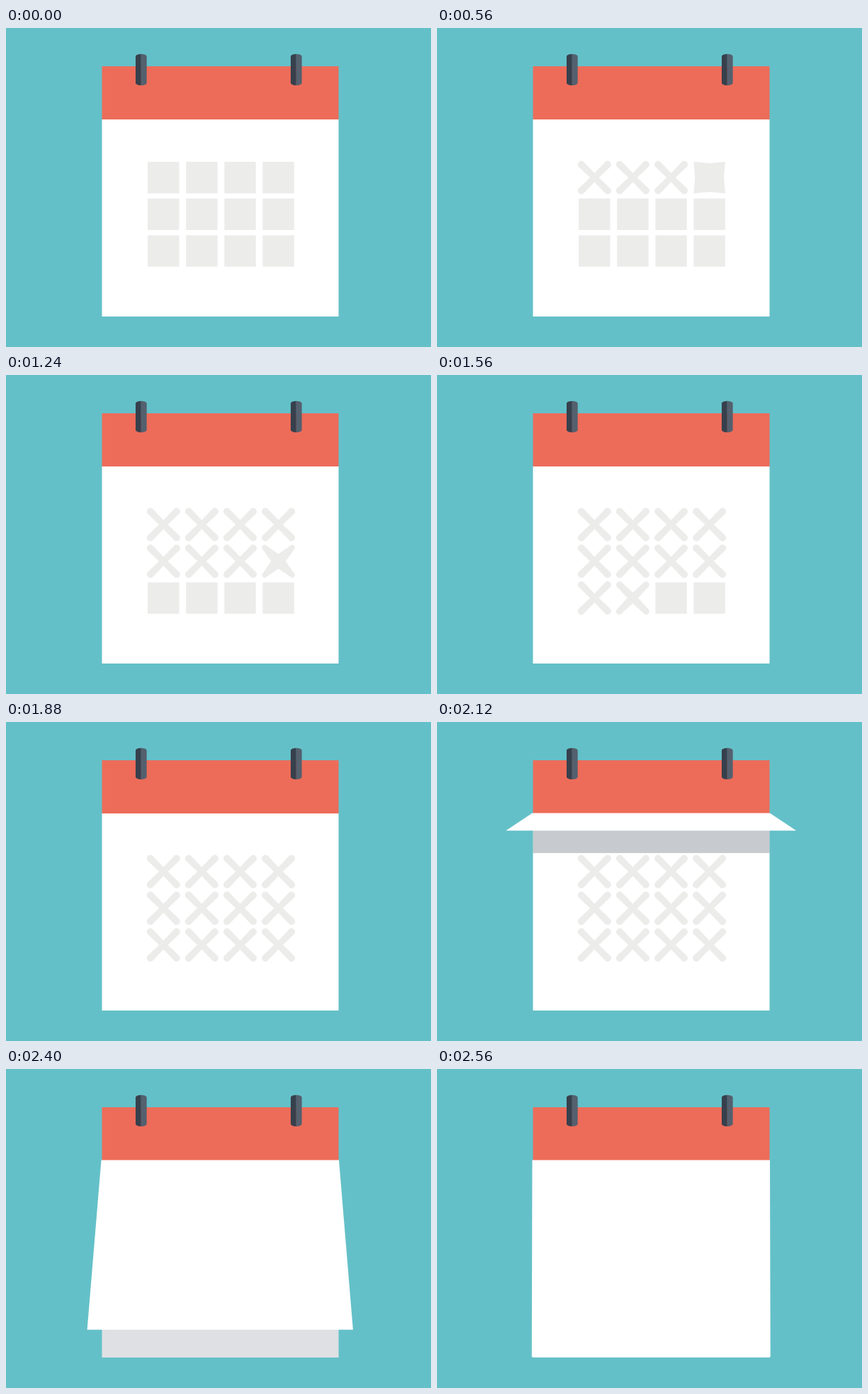
Animation of 600x450 px, one loop 2600 ms. Source, as an HTML page with a canvas:

```html
<!DOCTYPE html>
<html>
<head>
<meta charset="utf-8">
<title>Calendar</title>
<style>
  html, body { margin: 0; height: 100%; overflow: hidden; background: #64c0c8; }
  canvas { display: block; }
</style>
</head>
<body>
<canvas id="stage" width="600" height="450"></canvas>
<script>
const ctx = document.getElementById('stage').getContext('2d');
const LOOP = 2600, STEP = 40;
const LEFT = 135.5, RIGHT = 469.5, HINGE = 129, HEIGHT = 278;

const clamp = x => Math.max(0, Math.min(1, x));
const progress = (t, start, length) => clamp((t - start) / length);
const easeSine = x => (1 - Math.cos(Math.PI * x)) / 2;
const mix = (a, b, k) => a + (b - a) * k;

function rect(color, x, y, w, h) {
  ctx.fillStyle = color;
  ctx.fillRect(x, y, w, h);
}

// A square (k = 0) that pinches into a rounded cross (k = 1)
function drawCell(x, y, k) {
  const half = 22.2;
  const notch = mix(half, 6.2, k);
  const near = mix(half, 15, k), far = mix(half, 22, k);
  const nearPull = mix(half, 19.7, k), farPull = mix(half, 26.7, k);
  ctx.save();
  ctx.translate(x, y);
  ctx.beginPath();
  for (let side = 0; side < 4; side++) {
    ctx.lineTo(0, -notch);
    ctx.lineTo(near, -far);
    ctx.bezierCurveTo(nearPull, -farPull, farPull, -nearPull, far, -near);
    ctx.rotate(Math.PI / 2);
  }
  ctx.fillStyle = '#ececeb';
  ctx.fill();
  ctx.restore();
}

function drawCells(t) {
  for (let i = 0; i < 12; i++) {
    const x = 222.3 + (i % 4) * 54.1;
    const y = 211 + Math.floor(i / 4) * 51.8;
    drawCell(x, y, progress(t, 102 + i * 147, 147));
  }
}

function drawShadow(t) {
  const reach = progress(t, 1990, 290) ** 2;
  ctx.globalAlpha = 0.3 * clamp((2630 - t) / 390);
  rect('#46525f', LEFT, HINGE, RIGHT - LEFT, HEIGHT * reach);
  ctx.globalAlpha = 1;
}

function drawFallingPage(t) {
  const drop = Math.sin(Math.PI / 2 * easeSine(progress(t, 2026, 621)));
  if (!drop) return;
  const flare = 37 * (1 - drop ** 5);
  const bottom = HINGE + HEIGHT * drop;
  ctx.beginPath();
  ctx.moveTo(LEFT - 1, HINGE - 0.5);
  ctx.lineTo(RIGHT + 0.5, HINGE - 0.5);
  ctx.lineTo(RIGHT + 0.7 + flare, bottom);
  ctx.lineTo(LEFT - 1.2 - flare, bottom);
  ctx.fillStyle = '#fff';
  ctx.fill();
}

function drawRing(x) {
  ctx.save();
  ctx.beginPath();
  ctx.moveTo(x - 8, 40);
  ctx.bezierCurveTo(x - 7, 35.5, x + 7, 35.5, x + 8, 40);
  ctx.lineTo(x + 8, 77.5);
  ctx.bezierCurveTo(x + 7, 82, x - 7, 82, x - 8, 77.5);
  ctx.clip();
  rect('#37404d', x - 8, 35, 8, 48);
  rect('#54606e', x, 35, 8, 48);
  ctx.restore();
}

function draw(now) {
  const t = Math.floor(now / STEP + 0.1) * STEP % LOOP;
  rect('#64c0c8', 0, 0, 600, 450);
  rect('#ed6c59', LEFT, 54, RIGHT - LEFT, 75);
  rect('#fff', LEFT, HINGE, RIGHT - LEFT, HEIGHT);
  drawCells(t);
  drawShadow(t);
  drawFallingPage(t);
  drawRing(190.8);
  drawRing(409.8);
  requestAnimationFrame(draw);
}
requestAnimationFrame(draw);
</script>
</body>
</html>
```
